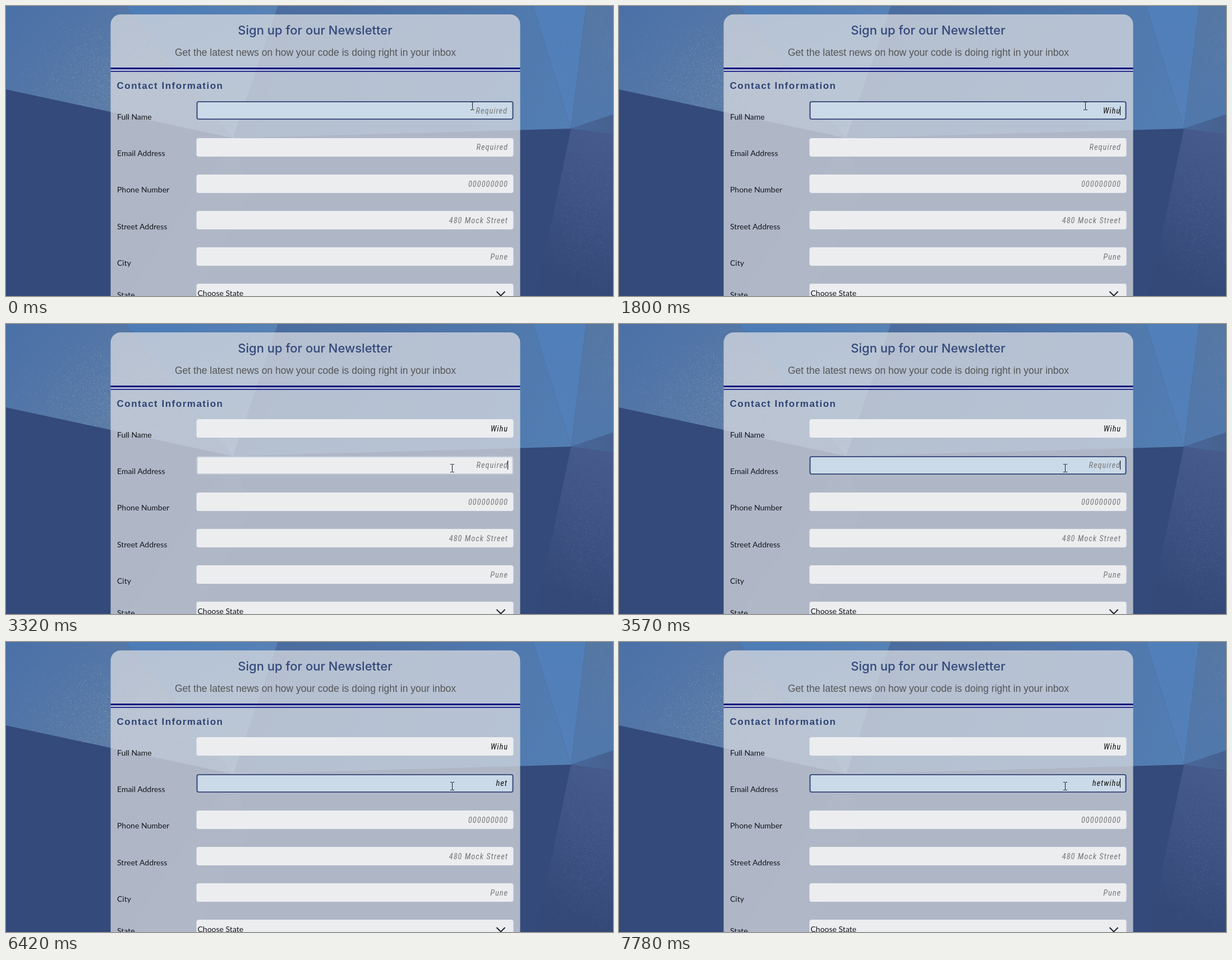
These frames come from a looping animation (1082 by 518 pixels, 8000 ms). An HTML page with a canvas:

```html
<!DOCTYPE html>
<html lang="en">
<head>
<meta charset="utf-8">
<title>Newsletter sign-up</title>
<style>
  html, body { margin: 0; width: 100%; height: 100%; overflow: hidden; background: #334a7a; }
  canvas, svg { position: absolute; left: 0; top: 0; width: 1082px; height: 518px; }
  text { white-space: pre; }
  .title { font: 500 22px Inter, sans-serif; fill: #33487a; text-anchor: middle; }
  .lead { font: 17.5px "Liberation Sans", Arial, sans-serif; fill: #555; text-anchor: middle; }
  .section { font: bold 17px "Liberation Sans", Arial, sans-serif; letter-spacing: 1.5px; fill: #2e4374; }
  .label { font: 14px Lato, sans-serif; fill: #15171c; }
  .value {
    font-family: "Roboto Condensed", Roboto, sans-serif;
    font-size: var(--size, 14.4px); font-style: italic; font-stretch: 75%;
    letter-spacing: 1px; fill: #111; text-anchor: end;
  }
  .hint { fill: #777; }
  .box { fill: #ecedef; }
  .soft { fill: #ebedef; stroke: #c3cad9; stroke-width: 2; }
  .focus { fill: #cbdae8; stroke: #43537f; stroke-width: 2.2; }
</style>
</head>
<body>
<canvas id="wall" width="1082" height="518"></canvas>
<svg viewBox="0 0 1082 518">
  <path d="M186.5 518V33a18 18 0 0 1 18-18H898.5a18 18 0 0 1 18 18V518Z" fill="rgba(217,219,225,.75)"/>
  <path d="M186.5 110h730v3h-730zM186.5 116h730v1.5h-730z" fill="#000080"/>
  <text class="title" x="551" y="51">Sign up for our Newsletter</text>
  <text class="lead" x="551.5" y="88.5">Get the latest news on how your code is doing right in your inbox</text>
  <text class="section" x="197.5" y="147.5">Contact Information</text>
  <g id="rows"></g>
  <text class="label" x="341.5" y="518">Choose State</text>
  <path d="M874.5 510l7.5 7.5 7.5-7.5" fill="none" stroke="#1c1f26" stroke-width="2"/>
  <path id="wave" fill="none" stroke="#e0222a"/>
  <rect id="caret" width="1" height="16" fill="#000"/>
  <path id="beam" d="M0 0h3v1h1v-1h3v1h-3v13h3v1h-3v-1h-1v1h-3v-1h3v-13h-3z" fill="#16191f"/>
</svg>
<script>
const LOOP = 8000;
const $ = id => document.getElementById(id);

function paintWall() {
  const c = $('wall').getContext('2d');
  let seed = 11;
  const rnd = () => (seed = seed * 16807 % 2147483647) / 2147483647;
  const bell = () => rnd() + rnd() + rnd() - 1.5;

  // A facet takes a corner list, a gradient line and its two colours.
  function facet(points, line, from, to, dots) {
    const g = c.createLinearGradient(...line);
    g.addColorStop(0, from);
    g.addColorStop(1, to);
    c.save();
    c.beginPath();
    points.forEach(p => c.lineTo(...p));
    c.closePath();
    c.fillStyle = g;
    c.fill();
    c.clip();
    if (dots) {
      const [x, y, w, h, n, color] = dots;
      c.fillStyle = color;
      for (let i = 0; i < n; i++)
        c.fillRect(Math.round(x + bell() * w), Math.round(y + bell() * h), 1, 1);
    }
    c.restore();
  }

  const left = [405, 236], right = [1007, 219];
  c.fillStyle = '#334a7a';
  c.fillRect(0, 0, 1082, 518);
  facet([[0, 0], [213, 0], left, [0, 149]], [0, 0, 190, 190], '#4a70a8', '#5c7ca6',
        [240, 130, 170, 90, 5500, 'rgba(165,185,205,.3)']);
  facet([[213, 0], [485, 0], left], [300, 0, 400, 230], '#4d7cb6', '#6b8db2');
  facet([[485, 0], [940, 0], right, left], [480, 0, 1000, 210], '#4b6c9f', '#527eb3');
  facet([[940, 0], [1034, 0], right], [980, 0, 1000, 219], '#517fb9', '#5480b8');
  facet([[1034, 0], [1082, 0], [1082, 194], right], [1050, 0, 1040, 210], '#5577a3', '#5178ac',
        [1075, 80, 35, 90, 900, 'rgba(120,145,175,.3)']);
  facet([right, [1082, 194], [1082, 230]], [1010, 219, 1082, 212], '#48689a', '#46618f');
  facet([right, [1082, 230], [1082, 518], [945, 518]], [1082, 240, 970, 470], '#465a8c', '#344978',
        [1040, 360, 75, 130, 4200, 'rgba(95,115,160,.28)']);
  facet([left, [435, 335], [340, 518], [215, 518]], [400, 236, 260, 518],
        'rgba(90,105,140,.18)', 'rgba(90,110,150,.1)');
}

// Row 0 is the name field, row 1 the email field.
const labels = ['Full Name', 'Email Address', 'Phone Number', 'Street Address', 'City', 'State'];
const hints = ['Required', 'Required', '000000000', '480 Mock Street', 'Pune', ''];
const typed = [
  { text: 'Wihu', keys: [800, 1300, 1550, 1800] },
  { text: 'hetwihu', keys: [5350, 5880, 6150, 6670, 6950, 7220, 7780] }
];
const blinks = [530, 2300, 2800, 3820, 4320, 4820, 5350, 6420, 6670];
const count = (times, t) => times.filter(x => x <= t).length;
const rowStep = y => i => Math.round(y + 65.2 * i);
const boxTop = rowStep(170.4), valueBase = rowStep(192.2), labelBase = rowStep(203);

$('rows').innerHTML = labels.map((label, i) => `
  <rect class="box" x="339.5" y="${boxTop(i)}" width="565" height="33" rx="4"/>
  <text class="label" x="198" y="${i < 5 ? labelBase(i) : 521}">${label}</text>
  <text class="value hint" x="895" y="${valueBase(i)}">${hints[i]}</text>`).join('');
const boxes = document.querySelectorAll('#rows rect');
const values = document.querySelectorAll('#rows .value');

// Without a condensed face, a smaller size keeps the text compact.
if (values[0].getComputedTextLength() > 62)
  document.documentElement.style.setProperty('--size', '12.4px');

function setBox(i, style) {
  const inset = style === 'box' ? 0 : 1;
  const attrs = {
    class: style, x: 339.5 + inset, y: boxTop(i) + inset,
    width: 565 - 2 * inset, height: 33 - 2 * inset, rx: 4 - inset
  };
  for (const k in attrs) boxes[i].setAttribute(k, attrs[k]);
}

function draw(t) {
  const active = t < 3320 ? 0 : 1;
  const style = t >= 3320 && t < 3570 ? 'soft' : 'focus';
  const edge = style === 'focus' ? 894 : 895;

  typed.forEach(({ text, keys }, i) => {
    const n = count(keys, t);
    setBox(i, i === active ? style : 'box');
    values[i].textContent = n ? text.slice(0, n) : hints[i];
    values[i].setAttribute('class', n ? 'value' : 'value hint');
    values[i].setAttribute('x', i === active ? edge : 895);
  });

  $('caret').setAttribute('x', edge - 1);
  $('caret').setAttribute('y', active ? 244 : 179);
  $('caret').style.display = count(blinks, t) % 2 ? '' : 'none';
  $('wave').style.display = t >= 2800 && t < 3320 ? '' : 'none';
  const [x, y] = t < 2550 ? [828, 171] : t < 2800 ? [821, 194] : [792, 250];
  $('beam').setAttribute('transform', `translate(${x} ${y})`);
}

paintWall();
$('wave').setAttribute('d', 'M862 194.5' + 'l2-2 2 2'.repeat(7) + 'l2-2');

const start = performance.now();
function tick() {
  draw((performance.now() - start) % LOOP);
  requestAnimationFrame(tick);
}
tick();
</script>
</body>
</html>
```
